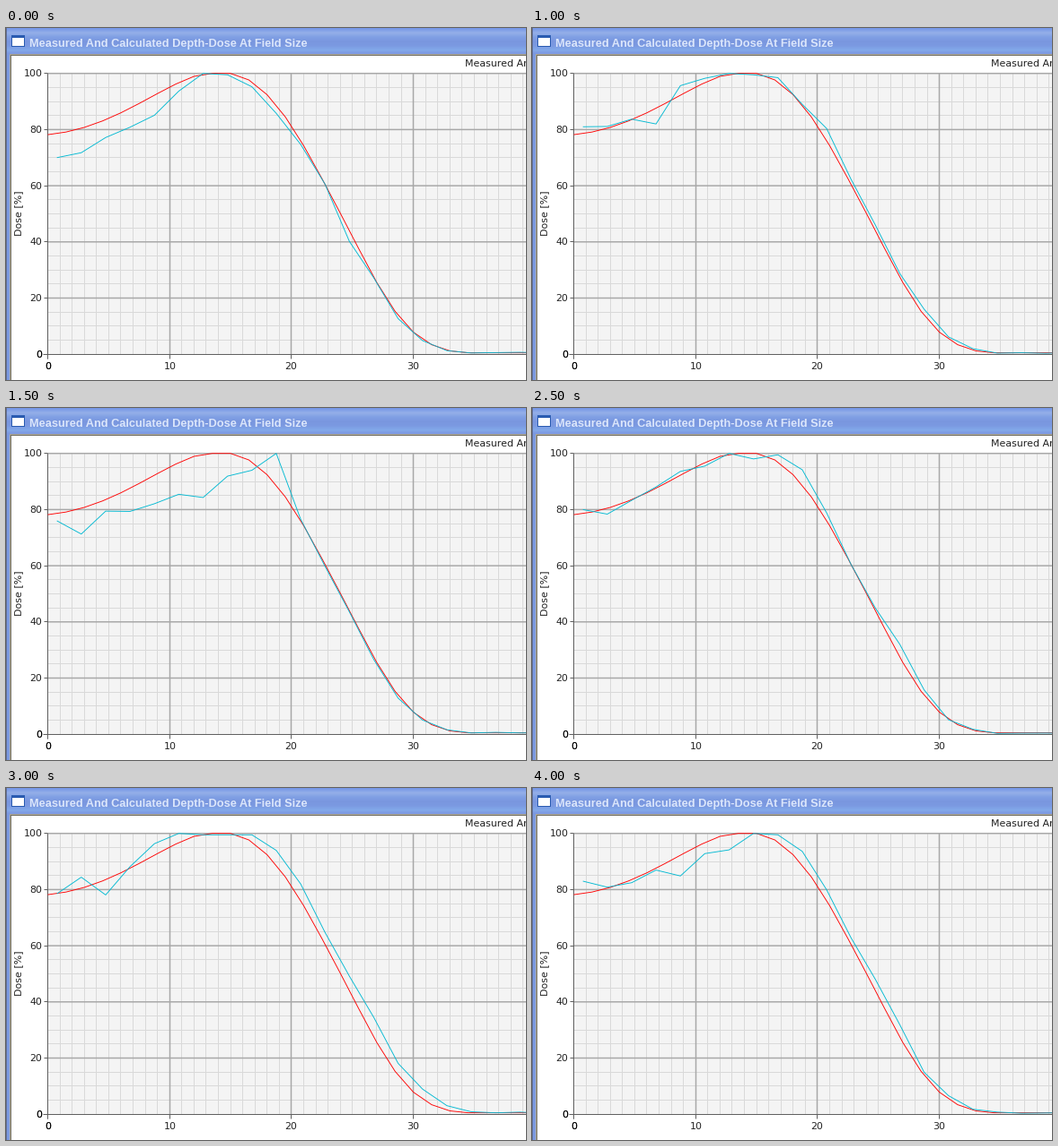
Recreate the animation shown at these times as a matplotlib script. Size 579 px wide and 393 px high, loop 4.5 s.

```python
import math

import numpy as np
import matplotlib.pyplot as plt
from matplotlib.animation import FuncAnimation
from matplotlib.colors import LinearSegmentedColormap
from matplotlib.patches import Rectangle

W, H, DPI = 579, 393, 64
PX = 72 / DPI                      # points per pixel
X0, Y0, XU, YU = 46.5, 364.2, 13.57, 3.135
MINOR, MAJOR, AXIS = "#d9d9d9", "#a8a8a8", "#606060"

# start dose, depth of the peak, shift of the fall-off for each measured run
RUNS = [(70, 12.75, 0), (79, 14.75, -0.3), (81, 12.75, 0.3),
        (76, 18.75, 0), (75, 14.75, -1), (80, 12.75, 0.3),
        (78.5, 10.75, 0.8), (77, 14.75, -0.3), (83, 14.75, 0.3)]

fig = plt.figure(figsize=(W / DPI, H / DPI), dpi=DPI, facecolor="white")
ax = fig.add_axes([0, 0, 1, 1])
ax.set_xlim(0, W)
ax.set_ylim(H, 0)
ax.axis("off")


def px(depth):
    return X0 + XU * depth


def py(dose):
    return Y0 - YU * dose


def mid(v):
    """Centre of the pixel that holds v."""
    return math.floor(v) + 0.5


def box(x, y, w, h, color, z=1):
    ax.add_patch(Rectangle((x, y), w, h, fc=color, ec="none", lw=0,
                           antialiased=False, zorder=z))


def line(xs, ys, color, width=1.0, z=3):
    return ax.plot(xs, ys, color=color, lw=width * PX, zorder=z, snap=False,
                   solid_capstyle="butt", solid_joinstyle="round")[0]


def label(x, y, s, size=11, color="#222222", ha="left", va="baseline", **kw):
    kw.setdefault("family", "DejaVu Sans")
    ax.text(x, y, s, fontsize=size * PX, color=color, ha=ha, va=va,
            zorder=8, **kw)


def draw_window():
    bar = LinearSegmentedColormap.from_list("bar", [
        "#7697e7", "#94afe8", "#7f9fe3", "#7996de", "#7b99e1", "#82a9e9",
        "#7a93df"])
    for y in range(30):
        box(0, y, W, 1, bar(y / 29))
    box(0, 29, 6, H, "#7b99e1")
    box(0, 0, 1, H, "#5f6c93", 2)
    for i, color in enumerate(("#aca899", "#716f64")):
        box(4 + i, 29 + i, W, 1, color, 2)
        box(4 + i, 29 + i, 1, H, color, 2)

    # small window icon
    box(6, 8, 15, 13, "#2a5bb0", 3)
    box(7, 11, 13, 9, "#ffffff", 4)
    label(26, 21, "Measured And Calculated Depth-Dose At Field Size", 12.75,
          "#dbe6fb", family="Liberation Sans", weight="bold")


def draw_chart():
    top, bottom = py(100), mid(Y0)
    box(46, 51, W - 46, 314, "#f4f4f4")
    for i in range(1, 40):
        x = mid(px(i))
        if i % 10:
            line([x, x], [top, bottom], MINOR)
        else:
            line([x, x], [top, bottom], MAJOR, 1.5, 4)
    for v in range(5, 101, 5):
        if v % 20:
            line([X0, W], [mid(py(v))] * 2, MINOR)
        else:
            line([X0, W], [py(v)] * 2, MAJOR, 1.5, 4)

    line([X0, X0], [top, bottom + 5], AXIS, z=5)
    line([X0 - 5, W], [bottom, bottom], AXIS, z=5)
    for v in range(0, 101, 20):
        line([X0 - 4, X0], [mid(py(v))] * 2, AXIS, z=5)
        label(40.5, py(v) + 3.6, str(v), ha="right")
    for v in range(0, 31, 10):
        x = mid(px(v))
        line([x, x], [bottom, bottom + 5], AXIS, z=5)
        label(x, 380.6, str(v), ha="center")
    # the zero labels look heavier
    label(40.5, py(0) + 3.6, "0", ha="right", color="black")
    label(X0 + 0.5, 380.6, "0", ha="center", color="black")

    label(14, 206.5, "Dose [%]", ha="center", va="center", rotation=90)
    label(511, 43, "Measured And Calculated")


def dose(depth):
    """Slow build-up cut off by a Gaussian edge, in percent."""
    build = 78.2 + 0.4 * depth + 0.165 * depth ** 2
    z = (20.5 - depth) / 5.85 - 0.006 * max(depth - 24, 0) ** 2
    edge = 0.5 * (1 + math.erf(z / math.sqrt(2)))
    return min(100, max(0.5, build * edge))


def measured(run):
    """Run climbs to its peak, then follows the edge, with counting noise."""
    start, peak, shift = RUNS[run]
    rng = np.random.default_rng(run)
    values = []
    for d in depths:
        if d < peak:
            t = (d - depths[0]) / (peak - depths[0])
            level = start + (100 - start) * t ** 1.5
        else:
            level = dose(d - shift)
        noise = 0.25 * math.sqrt(level) * rng.standard_normal()
        if d == depths[0]:
            level, noise = start, 0
        if d == peak:
            level, noise = 100, 0
        values.append(min(99.5 if d != peak else 100, max(0.2, level + noise)))
    return np.array(values)


draw_window()
draw_chart()

fit_depths = 1.5 * np.arange(28)
line(px(fit_depths), [py(dose(d)) for d in fit_depths], "#ff0000", 0.9, 6)

depths = 0.75 + 2 * np.arange(21)
trace = line([], [], "#00b9d2", 0.9, 7)


def update(i):
    trace.set_data(px(depths), py(measured(i)))
    return trace,


anim = FuncAnimation(fig, update, frames=len(RUNS), interval=500, repeat=True,
                     init_func=lambda: update(0))
plt.show()
```
